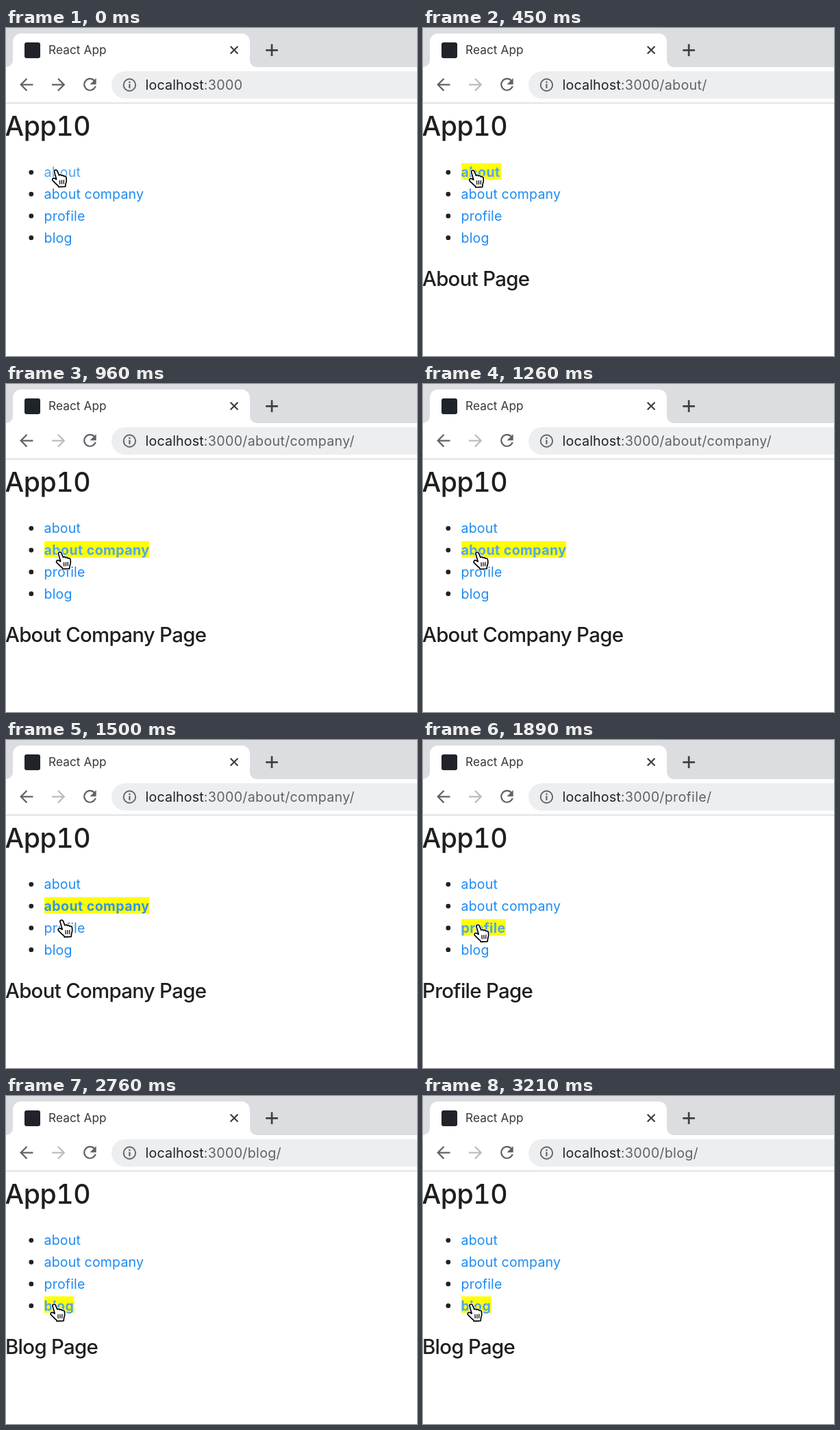
An HTML page for the animation above (3.27 s loop, 600 by 478 pixels).

```html
<!DOCTYPE html>
<html lang="en">
<head>
<meta charset="utf-8">
<title>React App</title>
<style>
  html, body { margin: 0; width: 100%; height: 100%; overflow: hidden; background: #fff; }
  svg { display: block; width: 600px; height: 478px; }
  text { font-family: Inter, "Open Sans", sans-serif; font-optical-sizing: none; white-space: pre; }
  .tab { font-size: 17.2px; letter-spacing: .09px; fill: #35383c; }
  .url { font-size: 19.7px; letter-spacing: .12px; fill: #202124; }
  .path { letter-spacing: .29px; fill: #5f6266; }
  .h1, .h2 { font-weight: 500; fill: #1f1f1f; }
  .h1 { font-size: 39.2px; letter-spacing: -.012em; font-variant-numeric: tabular-nums; }
  .h2 { font-size: 29.4px; letter-spacing: -.0235em; }
  .link { font-size: 19.55px; letter-spacing: .16px; }
  .link.on { font-weight: 700; letter-spacing: .43px; }
  .icon { fill: none; stroke: #5f6368; stroke-width: 2.2; }
</style>
</head>
<body>
<svg viewBox="0 0 600 478">
  <rect width="600" height="478" fill="#fff"/>

  <!-- tab strip -->
  <rect width="600" height="57" fill="#dcdde0"/>
  <path d="M0 57A10 10 0 0 0 10 47V20A12 12 0 0 1 22 8H344A12 12 0 0 1 356 20V47A10 10 0 0 0 366 57Z" fill="#fff"/>
  <rect x="27" y="21" width="23" height="23" rx="3" fill="#20232a"/>
  <text class="tab" x="62" y="38">React App</text>
  <path class="icon" d="M327.7 26.7l10.8 10.8m0-10.8l-10.8 10.8" style="stroke:#3c4043"/>
  <path class="icon" d="M379.3 32.3h17.6m-8.8-8.8v17.6" style="stroke:#3c4043;stroke-width:2.7"/>

  <!-- toolbar -->
  <path class="icon" d="M39.5 82.6H22M30.5 73.8l-8.8 8.8 8.8 8.8"/>
  <path class="icon" id="forward" d="M67 82.6H84.5M76 73.8l8.8 8.8-8.8 8.8"/>
  <path class="icon" d="M129 76.8A8.4 8.4 0 1 0 130.7 84.8"/>
  <path d="M131.7 73v9.2h-9.2z" fill="#5f6368"/>
  <rect x="154" y="63" width="480" height="40" rx="20" fill="#edeef0"/>
  <circle class="icon" cx="180.4" cy="83" r="8.7" style="stroke-width:1.9"/>
  <path class="icon" d="M180.4 81.6v6.2M180.4 77.8v2.2"/>
  <text class="url" x="203.6" y="90">localhost<tspan class="path" id="path"></tspan></text>
  <rect y="108.6" width="600" height="1.6" fill="#d9dadc"/>

  <!-- page -->
  <text class="h1" x="-1.6" y="156.8">App10</text>
  <g id="list"></g>
  <text class="h2" id="heading" x="-1" y="376"></text>

  <g id="hand" stroke-linejoin="round" stroke-linecap="round">
    <path id="palm" fill="#fff" stroke="#fff" stroke-width="3.4" d="M3.9 3.8C3.2 1.2 6.6 .2 7.9 2.4L10.4 8.4C11.2 7.5 13.2 7.6 13.7 8.9C14.6 8.1 16.5 8.5 16.9 9.9C18.4 9.2 20.1 10 20.4 11.8C21 15 20.8 17.5 19.5 20.2L19.1 24L9.8 24.6L9.3 23C7 21.5 4.4 18.4 1.7 15.9C.2 14.2 1.9 11.7 4.2 12.7L6.9 14.2Z"/>
    <path id="outline" fill="#fff" stroke="#000" stroke-width="1.6"/>
    <path fill="none" stroke="#000" stroke-width="1.2" d="M11.4 15.6l.2 4.8M14.2 15.4v4.8M17 15.2l-.2 4.8"/>
  </g>
</svg>
<script>
const LOOP = 3270, STEP = 30, FADE = 300;
const BLUE = [30, 140, 242], HOVER = [80, 166, 240];
const $ = id => document.getElementById(id);

// box: highlight width; hover: when the pointer enters and leaves
const links = [
  { label: 'about', box: 58, hover: [-FADE, 570] },
  { label: 'about company', box: 153, hover: [630, 1320] },
  { label: 'profile', box: 65, hover: [1440, 2310] },
  { label: 'blog', box: 43.5, hover: [2310, 9999] }
];

const pages = [
  { at: 0, path: '', title: '', active: -1 },
  { at: 150, path: '/about/', title: 'About Page', active: 0 },
  { at: 960, path: '/about/company/', title: 'About Company Page', active: 1 },
  { at: 1800, path: '/profile/', title: 'Profile Page', active: 2 },
  { at: 2760, path: '/blog/', title: 'Blog Page', active: 3 }
];

const easeIn = u => u * u;
const easeOut = u => u * (2 - u);
const linear = u => u;

// pointer stops: time, x, y, easing on the way there
const stops = [
  [0, 67, 206, linear], [420, 67, 206, linear],
  [600, 69.8, 226, easeIn], [720, 72.5, 243, easeOut], [780, 73, 244, linear],
  [1230, 73, 244, linear], [1260, 73.5, 244.2, linear],
  [1500, 75.5, 261.5, easeIn], [1650, 74.5, 268.5, easeOut],
  [2200, 74.5, 268.5, linear],
  [2370, 64.5, 291.5, easeIn], [2520, 64.5, 302.5, easeOut],
  [LOOP, 64.5, 302.5, linear]
];

const clamp = u => Math.max(0, Math.min(1, u));
const smooth = u => u * u * (3 - 2 * u);
const mix = (a, b, u) => a + (b - a) * u;
const blend = (a, b, u) => `rgb(${a.map((v, i) => Math.round(mix(v, b[i], u)))})`;

function add(tag, attrs) {
  const el = document.createElementNS('http://www.w3.org/2000/svg', tag);
  for (const key in attrs) el.setAttribute(key, attrs[key]);
  $('list').append(el);
  return el;
}

links.forEach((link, i) => {
  const y = 209.9 + i * 31.8;
  add('circle', { cx: 36.8, cy: y + .4, r: 3.4, fill: '#222' });
  link.mark = add('rect', { x: 56, y: Math.round(y - 12.9), width: link.box, height: 24, fill: '#ff0' });
  link.text = add('text', { x: 55.6, y: y + 7.2 });
  link.text.textContent = link.label;
});
$('outline').setAttribute('d', $('palm').getAttribute('d'));

function pointerAt(t) {
  const i = stops.findIndex(s => s[0] > t);
  const [t0, x0, y0] = stops[i - 1], [t1, x1, y1, ease] = stops[i];
  const u = ease((t - t0) / (t1 - t0));
  return [mix(x0, x1, u) - .6, mix(y0, y1, u) - .4];
}

function draw(t) {
  const page = pages.filter(p => p.at <= t).pop();
  $('path').textContent = ':3000' + page.path;
  $('heading').textContent = page.title;
  $('forward').style.stroke = blend([95, 99, 104], [186, 188, 191], clamp((t - 120) / 120));

  links.forEach((link, i) => {
    const on = i === page.active;
    const [enter, leave] = link.hover;
    const glow = smooth(clamp((t - enter) / FADE)) - smooth(clamp((t - leave) / FADE));
    link.mark.style.display = on ? '' : 'none';
    link.text.setAttribute('class', on ? 'link on' : 'link');
    link.text.style.fill = blend(BLUE, HOVER, glow);
  });

  $('hand').setAttribute('transform', `translate(${pointerAt(t)}) scale(1.06)`);
}

const start = performance.now();
function tick() {
  const t = (performance.now() - start) % LOOP;
  draw(Math.floor(t / STEP) * STEP);
  requestAnimationFrame(tick);
}
draw(0);
requestAnimationFrame(tick);
</script>
</body>
</html>
```
